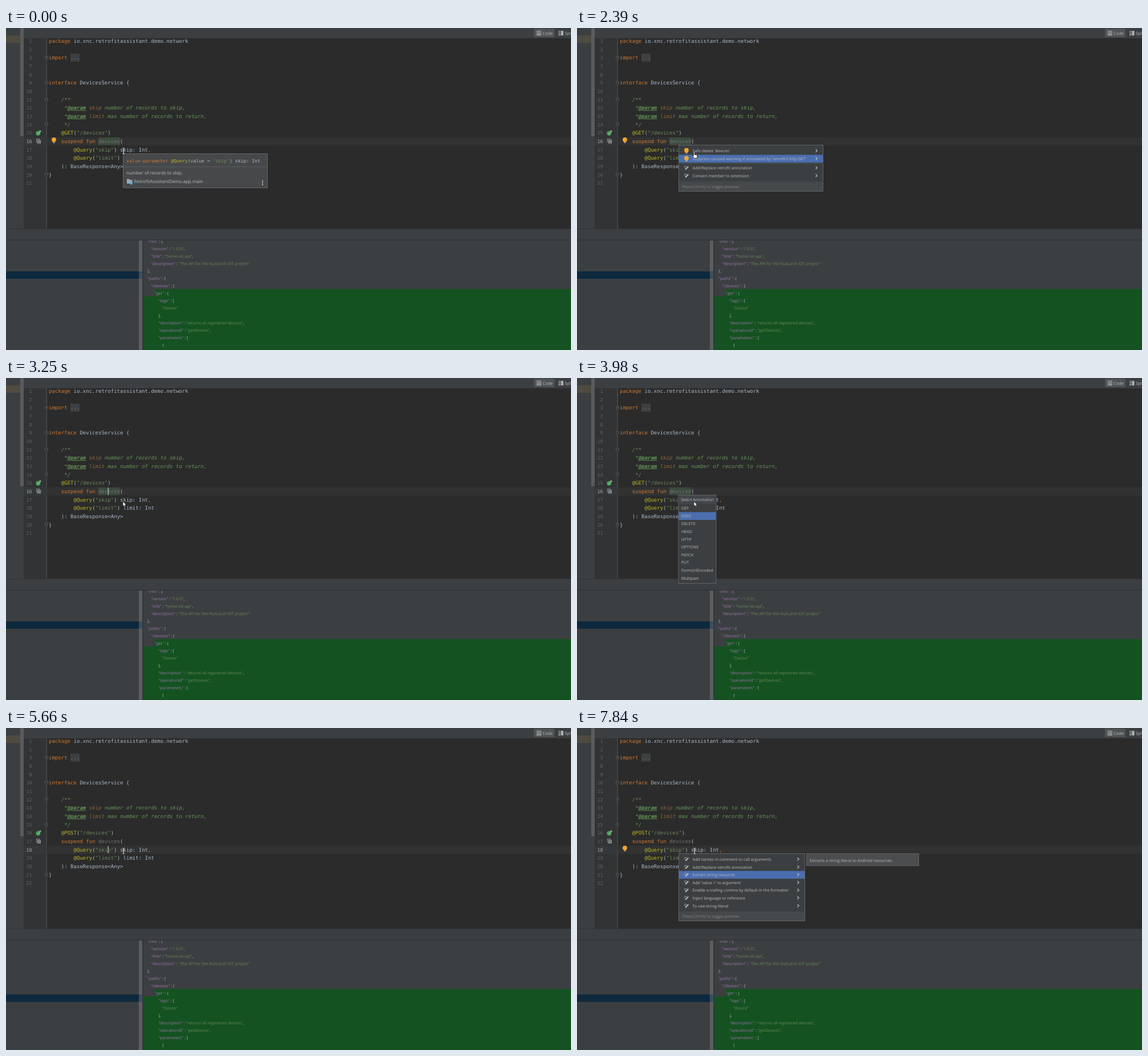
An HTML page that plays this animation: 991x565 px, repeating every 8000 ms.

```html
<!DOCTYPE html>
<html lang="en">
<head>
<meta charset="utf-8">
<title>Editor intentions</title>
<style>
html, body { margin: 0; width: 100%; height: 100%; overflow: hidden; background: #2b2b2b; }
svg { display: block; width: 991px; height: 565px; }
text { white-space: pre; text-rendering: geometricPrecision; }
.mono { font-family: "DejaVu Sans Mono", monospace; font-size: 9.04px; }
.ui { font-family: "Open Sans", "Noto Sans", sans-serif; font-size: 7.1px; }
.f { fill: #a9b7c6; } .k { fill: #cc7832; } .a { fill: #bbb529; } .s { fill: #6a8759; }
.d { fill: #629755; font-style: italic; } .v { fill: #8a653b; font-style: italic; }
.p { fill: #629755; font-style: italic; font-weight: bold; text-decoration: underline; }
.u { fill: #72737a; } .c { fill: #808080; } .j { fill: #9876aa; } .w { fill: #bbbbbb; }
.n { fill: #606366; } .on { fill: #a4a3a3; }
</style>
</head>
<body>
<svg id="stage" viewBox="0 0 991 565" xmlns="http://www.w3.org/2000/svg"></svg>
<script>
const LOOP = 8000, CHAR = 5.442, ROW = 14.66, CODE_X = 75;
const rowY = r => 23 + r * ROW;
const esc = s => s.replace(/&/g, '&amp;').replace(/</g, '&lt;');
const rect = (x, y, w, h, fill, more = '') =>
  `<rect x="${x}" y="${y}" width="${w}" height="${h}" fill="${fill}" ${more}/>`;
const path = (d, stroke, more = '') => `<path d="${d}" fill="none" stroke="${stroke}" ${more}/>`;
const group = (id, body) => `<g id="${id}">${body}</g>`;
const frame = (x, y, w, h, fill) => rect(x + .5, y + .5, w - 1, h - 1, fill, 'stroke="#616467"');

// parts alternate: class, string, class, string...
function text(font, x, y, parts, more = '') {
  let spans = '';
  for (let i = 0; i < parts.length; i += 2)
    spans += `<tspan class="${parts[i]}">${esc(parts[i + 1])}</tspan>`;
  return `<text class="${font}" x="${x}" y="${y}" ${more}>${spans}</text>`;
}
const code = (row, col, ...parts) => text('mono', CODE_X + col * CHAR, rowY(row) + 3, parts);
const label = (x, mid, s, cls = 'w', more = '') => text('ui', x, mid + 2.6, [cls, s], more);

// Icons
const bulb = (x, y) => `<circle cx="${x}" cy="${y - 1}" r="3.9" fill="#f0a732"/>` +
  rect(x - 1.9, y + 2, 3.8, 1.4, '#f0a732') + rect(x - 1.5, y + 3.9, 3, 1.1, '#b9bcbe');
const pencil = (x, y) => path(`M${x - 4} ${y - 2.7}h5M${x - 4} ${y - .4}h2.6`, '#9a9da0') +
  path(`M${x - 1.8} ${y + 2.8}L${x + 3.3} ${y - 2.3}`, '#c3c6c8', 'stroke-width="1.9"');
const chevron = (x, y) => path(`M${x - 1.4} ${y - 2.6}l2.7 2.6l-2.7 2.6`, '#c4c6c8', 'stroke-width="1.1"');
const fold = (row, plus) => {
  const y = rowY(row);
  return `<path d="M68.5 ${y - 2.5}h5v4l-2.5 2l-2.5 -2z" fill="#2b2b2b" stroke="#5d6062" stroke-width=".8"/>` +
    path(`M69.7 ${y}h2.6` + (plus ? `M71 ${y - 1.3}v2.6` : ''), '#7c7f81', 'stroke-width=".7"');
};

function chrome() {
  return rect(0, 0, 991, 565, '#2b2b2b') + rect(31, 18, 40, 334, '#313335') +
    rect(0, 0, 991, 18, '#3c3f41') + rect(0, 0, 31, 352, '#3c3f41') +
    rect(0, 13, 25, 13, '#4f4b41') + rect(25, 0, 6, 190, '#595b5d') +
    rect(70.6, 18, 1, 334, '#55585a') +
    rect(926, 1, 36, 15, '#505456', 'rx="1.5"') +
    path('M930.5 5.5h8.5M930.5 7.8h8.5M930.5 10.1h8.5M930.5 12.4h8.5', '#b4b7b9', 'stroke-width="1.1"') +
    label(941, 9, 'Code', 'w', 'style="font-size:7.4px"') +
    path('M969 5.8h3.6M969 8h3.6M969 10.2h3.6M969 12.4h3.6', '#b4b7b9', 'stroke-width="1.1"') +
    rect(973.5, 5, 4, 8, '#b4b7b9') + label(980, 9, 'Split', 'w', 'style="font-size:7.4px"');
}

function source() {
  const query = (row, name, tail) =>
    code(row, 8, 'a', '@Query', 'f', '(', 's', `"${name}"`, 'f', `) ${name}: Int`, 'k', tail);
  const doc = (row, name, rest) => code(row, 5, 'd', '*', 'p', '@param', 'd', ' ', 'v', name, 'd', rest);
  const call = (id, name) => group(id, code(11, 4, 'a', '@' + name, 'f', '(', 's', '"/devices"', 'f', ')'));
  return code(0, 0, 'k', 'package ', 'f', 'io.xnc.retrofitassistant.demo.network') +
    rect(113, 45, 16, 14, '#3d3f40') + code(2, 0, 'k', 'import ', 'c', '...') +
    code(5, 0, 'k', 'interface ', 'f', 'DevicesService {') +
    code(7, 4, 'd', '/**') +
    doc(8, 'skip', ' number of records to skip,') +
    doc(9, 'limit', ' max number of records to return,') +
    code(10, 5, 'd', '*/') + call('callGet', 'GET') + call('callPost', 'POST') +
    code(12, 4, 'k', 'suspend fun ', 'u', 'devices', 'f', '(') +
    query(13, 'skip', ',') + query(14, 'limit', '') +
    code(15, 4, 'f', '): BaseResponse<Any>') + code(16, 0, 'f', '}') +
    fold(2, true) + [5, 7, 10, 16].map(r => fold(r)).join('');
}

function gutter() {
  let out = '';
  for (let r = 0; r < 18; r++)
    out += `<text class="mono n" id="num${r}" x="45.6" y="${rowY(r) + 3}" text-anchor="end" style="font-size:8.4px"></text>`;
  return out + '<circle cx="56.3" cy="184.7" r="4" fill="#499c54"/>' +
    path('M54.5 185.2l1.5 1.3l4.7 -6.2M58.3 180.3h2.5v2.5', '#b5d9ba', 'stroke-width=".9"') +
    rect(53.5, 194.8, 5, 5.2, 'none', 'stroke="#8b8e90"') + rect(55.5, 197, 5, 5, '#55585a', 'stroke="#9a9da0"') +
    path('M56.5 198.8h3M56.5 200.5h3', '#b4b7b9', 'stroke-width=".6"');
}

function bottom() {
  const pair = (key, value) => ['j', `"${key}"`, 'f', ' : ', 's', `"${value}"`, 'f', ','];
  const open = (key, mark) => ['j', `"${key}"`, 'f', ' : ' + mark];
  const lines = [
    [0, open('info', '{')], [1, pair('version', '1.0.0')], [1, pair('title', 'home-iot-api')],
    [1, ['j', '"description"', 'f', ' : ', 's', '"The API for the NutLarch IOT project"']],
    [0, ['f', '},']], [0, open('paths', '{')], [1, open('/devices', '{')], [2, open('get', '{')],
    [3, open('tags', '[')], [4, ['s', '"Device"']], [3, ['f', '],']],
    [3, pair('description', 'returns all registered devices')],
    [3, pair('operationId', 'getDevices')], [3, open('parameters', '[')], [4, ['f', '{']]
  ];
  const json = lines.map(([level, parts], i) =>
    text('ui', 248 + level * 6.5, 376.6 + i * 13.04, parts)).join('');
  return rect(0, 352, 991, 213, '#3c3f41') + rect(0, 352, 991, 1, '#323537') +
    rect(0, 371.5, 991, 1, '#2d3032') +
    rect(0, 427, 239, 13, '#0d293e', 'id="treeRow"') + rect(233, 373, 6, 192, '#a6a6a6', 'opacity=".3"') +
    rect(239, 373, 2, 192, '#35383a') +
    rect(261, 458, 730, 13.5, '#155221') + rect(241, 471, 750, 94, '#155221') +
    `<clipPath id="pane"><rect x="241" y="373" width="750" height="192"/></clipPath><g clip-path="url(#pane)">${json}</g>`;
}

function hint() {
  return frame(205, 220, 254, 61, '#46484a') + rect(206, 243, 252, 1, '#595c5e') +
    text('mono', 211, 236, ['k', 'value-parameter ', 'a', '@Query', 'f', '(value = ', 's', '"skip"', 'f', ') skip: Int'],
      'style="font-size:8.14px"') +
    label(211, 254, 'number of records to skip,', 'w', 'style="font-size:8px"') +
    '<path d="M212 265h4l1.2 1.5h4.3v6.5h-9.5z" fill="#9aa7b0"/>' + rect(218, 270.5, 4, 4, '#40b6e0') +
    label(224.5, 269, 'RetrofitAssistantDemo.app.main', 'w', 'style="font-size:8px"') +
    [268.5, 271.7, 274.9].map(y => `<circle cx="450" cy="${y}" r="1" fill="#d0d2d4"/>`).join('');
}

function menu(id, y, w, h, foot, items, mids, icon) {
  const rows = items.map((s, i) => icon(i)(192, mids[i]) + label(202.7, mids[i], s) +
    chevron(178 + w - 12, mids[i] - .3)).join('');
  return group(id, frame(178, y, w, h, '#3c3f41') +
    rect(179, foot, w - 2, y + h - foot - 1, '#46494b') +
    rect(179, 0, w - 2, 13.6, '#4b6eaf', `id="${id}Pick"`) + rows +
    label(185, (foot + y + h) / 2 - .3, 'Press Ctrl+Q to toggle preview', 'c'));
}

const steps = (n, first) => Array.from({ length: n }, (_, i) => first + i * 13.6);
const METHOD_MIDS = [215.5, 229.3, 245.5, 259.2];
const ARG_MIDS = steps(7, 230.4);
const LIST_MIDS = steps(10, 228.6);

function popups() {
  const verbs = ['GET', 'POST', 'DELETE', 'HEAD', 'HTTP', 'OPTIONS', 'PATCH', 'PUT', 'FormUrlEncoded', 'Multipart'];
  return group('hint', hint()) +
    menu('methodMenu', 205, 254, 82, 269.5,
      ['Safe delete \'devices\'', 'Suppress unused warning if annotated by \'retrofit2.http.GET\'',
       'Add/Replace retrofit annotation', 'Convert member to extension'],
      METHOD_MIDS, i => i < 2 ? bulb : pencil) +
    group('methodLine', rect(182, 237, 246, 1, '#515456')) +
    group('methodInfo', frame(433, 205, 198, 34, '#4b4d4f') +
      label(440, 217.3, 'Add/Replaces Retrofit annotation for functions or') + label(440, 228.5, 'parameter')) +
    group('verbList', frame(177.5, 205, 67, 156, '#3c3f41') + rect(178.5, 206, 65, 15, '#42464a') +
      label(211, 213.2, 'Select Annotation', 'w', 'text-anchor="middle"') +
      rect(178.5, 0, 65, 13.6, '#4b6eaf', 'id="verbListPick"') +
      verbs.map((s, i) => label(183, LIST_MIDS[i], s)).join('')) +
    menu('argMenu', 220, 222, 119, 322,
      ['Add names in comment to call arguments', 'Add/Replace retrofit annotation', 'Extract string resource',
       'Add \'value =\' to argument', 'Enable a trailing comma by default in the formatter',
       'Inject language or reference', 'To raw string literal'],
      ARG_MIDS, () => pencil) +
    group('argPreview', frame(402, 220, 256, 18, '#2b2b2b') + rect(403, 221, 14, 16, '#313335') +
      rect(457, 222.5, 76, 13.5, '#344a3e') +
      text('mono', 406, 233, ['n', '18'], 'style="font-size:8.4px"') +
      text('mono', 419, 233, ['a', '@Query', 'f', '(', 'c', '/* value = */', 'f', ' ', 's', '"skip"',
        'f', ') skip: Int', 'k', ','])) +
    group('argInfo', frame(402, 220, 198, 22, '#4b4d4f') +
      label(408.3, 232, 'Extracts a string literal to Android resources.'));
}

function pointers() {
  const ink = 'fill="#fff" stroke="#111" stroke-width=".7" stroke-linejoin="round"';
  return group('beam', path('M204.2 210.8q2 0 2 1v8q0 1 -2 1M208.2 210.8q-2 0 -2 1v8q0 1 2 1', '#d8d8d8', 'stroke-width=".9"')) +
    group('hand', `<path d="M204.5 218.2q1 -1.4 2 0v4l3.6 .8q1 .3 .8 1.6l-.7 3.9h-4.6l-2.6 -3.6q-.2 -1.5 1.5 -.6z" ${ink}/>`) +
    group('arrow', `<path d="M205 216.5v8.6l2 -1.8l1.4 3l1.5 -.7l-1.4 -2.9h2.6z" ${ink}/>`);
}

const stage = document.getElementById('stage');
stage.innerHTML = chrome() +
  rect(31, 0, 40, 14.6, '#35383a', 'id="lineGutter"') + rect(71.6, 0, 920, 14.6, '#323232', 'id="line"') +
  rect(161.8, 192, 38.4, 13.5, '#3a4a3c', 'id="usage"') +
  source() + gutter() + group('bulb', bulb(84, 0)) + rect(178.6, 0, 1.1, 12.5, '#d0d0d0', 'id="caret"') +
  bottom() + popups() + pointers();

const el = {};
stage.querySelectorAll('[id]').forEach(n => el[n.id] = n);
const show = (id, on) => el[id].setAttribute('visibility', on ? 'visible' : 'hidden');
const setY = (id, y) => el[id].setAttribute('y', y);
const pick = (id, mid) => setY(id + 'Pick', mid - 6.8);

function draw(t) {
  const within = (a, b) => t >= a && t < b;
  const posted = t >= 4840, imported = t >= 4910, moved = t >= 5590;
  const active = moved ? 13 : 12;
  const top = rowY(active) - 7.2;

  show('callGet', !posted);
  show('callPost', posted);
  for (let r = 0; r < 18; r++) {
    el['num' + r].textContent = r < 3 ? r + 1 : r + (imported ? 5 : 4);
    el['num' + r].setAttribute('class', 'mono ' + (r === active ? 'on' : 'n'));
  }
  setY('line', top);
  setY('lineGutter', top);
  show('usage', !moved);
  setY('treeRow', t < 4980 ? 427 : 467.5);

  show('caret', within(190, 720) || within(3250, 3320) || within(4980, 6720));
  setY('caret', top + .9);
  show('bulb', within(0, 320) || within(720, 3250) || within(6450, 6720) || t >= 6785);
  el.bulb.setAttribute('transform', `translate(0 ${moved ? 211.5 : 197})`);

  show('hint', t < 650);
  const method = within(720, 3250);
  show('methodMenu', method);
  show('methodLine', method);
  pick('methodMenu', METHOD_MIDS[t < 2390 ? 0 : t < 2540 ? 1 : 2]);
  show('methodInfo', within(2610, 3250));
  el.methodInfo.setAttribute('opacity', Math.min(1, Math.max(0, (t - 2610) / 360)));

  show('verbList', within(3320, 4840));
  pick('verbList', LIST_MIDS[t < 3980 ? 0 : 1]);

  show('argMenu', t >= 6720);
  pick('argMenu', ARG_MIDS[t < 7640 ? 0 : t < 7740 ? 1 : 2]);
  show('argPreview', within(6850, 7640));
  show('argInfo', t >= 7840);

  show('hand', method);
  show('arrow', within(3250, 4840));
  show('beam', t < 720 || posted);
}

const start = performance.now();
function tick() {
  draw((performance.now() - start) % LOOP);
  requestAnimationFrame(tick);
}
draw(0);
requestAnimationFrame(tick);
</script>
</body>
</html>
```
